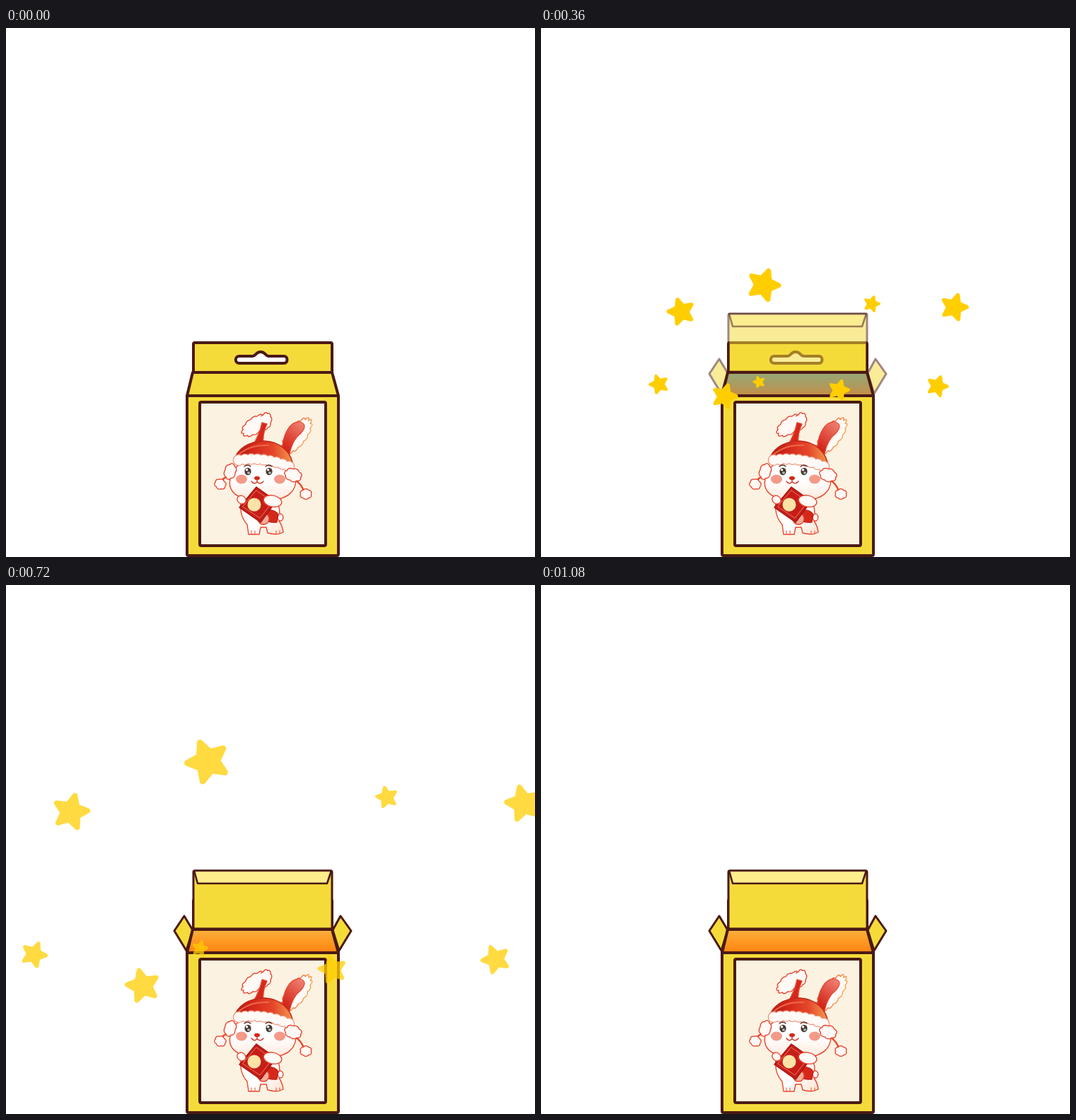
An HTML page with a canvas for the animation above (1.12 s loop, 748 by 748 pixels).

```html
<!DOCTYPE html>
<html lang="en">
<head>
<meta charset="utf-8">
<title>Gift box</title>
<style>
html, body { margin: 0; width: 100%; height: 100%; overflow: hidden; background: #fff; }
canvas { display: block; width: 748px; height: 748px; }
</style>
</head>
<body>
<canvas id="stage" width="748" height="748"></canvas>
<script>
const SIZE = 748, LOOP = 1120, STEP = 40, OPEN = 160;
const INK = '#4a1a14', YELLOW = '#f5db3a', PALE = '#ffee8c', CREAM = '#fcf2e1';
const RED = '#d5281b', LINE = '#e8452f', FUR = '#fffaf6', PINK = '#f49a88', GOLD = '#ffe3a6';
const TAU = 2 * Math.PI;

const view = document.getElementById('stage').getContext('2d');
let ctx = view;

const clamp = v => Math.max(0, Math.min(1, v));
const mix = (a, b, p) => a + (b - a) * p;

function paint(path, fill, stroke, width) {
  if (fill) { ctx.fillStyle = fill; ctx.fill(path); }
  if (stroke) {
    ctx.strokeStyle = stroke;
    ctx.lineWidth = width;
    ctx.stroke(path);
  }
}

function shape(d, fill, stroke, width = 4) {
  paint(new Path2D(d), fill, stroke, width);
}

function oval(x, y, rx, ry, fill, stroke, turn = 0) {
  const path = new Path2D();
  path.ellipse(x, y, rx, ry, turn, 0, TAU);
  paint(path, fill, stroke, 1.4);
}

function box(x, y, w, h, fill, width = 4) {
  const path = new Path2D();
  path.roundRect(x, y, w, h, 2);
  paint(path, fill, INK, width);
}

// Ellipse whose edge swells into n soft bumps
function fluff(x, y, rx, ry, turn, n, stroke = LINE) {
  const path = new Path2D();
  for (let a = 0; a < TAU; a += 0.05) {
    const k = 0.92 + 0.13 * Math.abs(Math.sin(a * n / 2));
    const u = rx * k * Math.cos(a), v = ry * k * Math.sin(a);
    path.lineTo(x + u * Math.cos(turn) - v * Math.sin(turn), y + u * Math.sin(turn) + v * Math.cos(turn));
  }
  path.closePath();
  paint(path, FUR, stroke, 1.4);
}

function fade(x0, y0, x1, y1, ...colors) {
  const g = ctx.createLinearGradient(x0, y0, x1, y1);
  colors.forEach((c, i) => g.addColorStop(i / (colors.length - 1), c));
  return g;
}

// Static artwork, drawn once and slightly softened
function layer(art) {
  const sheets = [0, 1].map(() => {
    const c = document.createElement('canvas');
    c.width = c.height = SIZE;
    return c;
  });
  const [sharp, soft] = sheets.map(c => c.getContext('2d'));
  ctx = sharp;
  ctx.lineJoin = ctx.lineCap = 'round';
  art();
  ctx = view;
  soft.filter = 'blur(0.5px)';
  soft.drawImage(sheets[0], 0, 0);
  return sheets[1];
}

function ears() {
  fluff(352, 562, 21, 11, -0.62, 12);
  fluff(367, 556, 8, 12, 0.25, 8);
  oval(353, 561, 17, 8, FUR, null, -0.62);
  shape('M349 590Q359 574 362 558L369 560Q362 575 364 590Z', RED, LINE, 1.4);
  fluff(411, 577, 30, 13, -0.92, 16, fade(398, 570, 430, 580, LINE, '#f9b25c'));
  shape('M391 596C391 574 402 556 415 557Q428 560 417 573Q405 582 401 602Z',
    fade(395, 592, 421, 560, RED, '#ef8173'), LINE, 1.2);
}

function body() {
  shape('M333 663Q328 688 341 702L343 716H358L360 706H368L370 714Q383 718 392 713Q391 704 386 697Q390 680 380 662Z',
    fade(345, 670, 385, 714, FUR, '#fff', '#ffe7d8'), LINE, 1.4);
  oval(388, 692, 3.8, 5, FUR, LINE);
  shape('M364 682Q380 679 385 688L383 699Q372 700 364 695Z', RED, '#b9201a', 1.2);
  oval(364, 694, 8, 8, '#f4ad98', LINE);
  for (const x of [347, 352, 382, 387]) shape(`M${x} 711v4`, null, LINE, 1);
}

function head() {
  shape('M320 628C306 660 335 669 363 668C397 669 416 656 408 626C397 602 331 604 320 628Z',
    fade(364, 610, 364, 668, '#fff', '#fff', '#ffe9dc'), LINE, 1.4);
  shape('M322 613C326 595 344 584 366 584C387 585 405 599 406 622Q366 598 322 613Z',
    fade(322, 610, 407, 604, '#a91713', RED, '#e4472b', '#f5a04f'), '#c2271a', 1.5);
  shape('M329 603Q345 589 371 590', null, '#ef6849', 2);
  // Brim: overlapping puffs along an arc
  for (const grow of [1.2, 0]) {
    for (let i = 0; i <= 8; i++) {
      const u = i / 8;
      oval(mix(329, 400, u), mix(611, 620, u) - 20 * u * (1 - u), 7 + grow, 7 + grow, grow ? '#f08f78' : FUR);
    }
  }
  shape('M316 634Q307 635 304 642M409 639Q418 645 421 655', null, LINE, 2.4);
  fluff(317, 627, 8, 11, 0.3, 6);
  fluff(406, 632, 12, 9, 0.3, 7);
  fluff(303, 645, 8, 7, 0.4, 6);
  fluff(424, 659, 8, 7, 0, 6);
}

function face() {
  for (const side of [-1, 1]) {
    const x = 357 + side * 15;
    oval(360 + side * 27, 638, 8, 6.5, PINK);
    oval(x, 627, 4.6, 5.2, '#4a3832');
    oval(x - 1.4, 624.8, 1.6, 1.7, '#fff');
    oval(x + 1, 629, 2, 1.8, '#a9c1b5');
    shape(`M${x - 5} 620q5 -4 9 0`, null, '#5b3029', 1.3);
  }
  oval(355, 636.5, 4, 2.7, RED);
  shape('M355 639v3M347 641q4 5 8 1q5 4 9 -1', null, '#cf382a', 1.5);
}

function card() {
  shape('M354 649L382 669L360 699L330 678Z', '#c71d18', '#a81712', 1.5);
  shape('M354 654L377 670L359 693L335 677Z', null, '#e9785b', 1);
  oval(351, 674, 9.5, 9.5, GOLD);
  oval(333, 667, 6.5, 5.5, FUR, LINE, 0.6);
  oval(377, 669, 13, 8, FUR, LINE, 0.2);
}

const MOUTH = 'M264 487H461L470 520H256Z';
const mouth = (...colors) => layer(() => shape(MOUTH, fade(0, 487, 0, 519, ...colors), INK));

const front = layer(() => {
  box(256, 520, 214, 226, YELLOW);
  box(274, 529, 178, 203, CREAM);
  for (const part of [ears, body, head, face, card]) part();
});

const hanger = layer(() => {
  box(265, 445, 196, 43, YELLOW);
  shape('M330 464H349C353 464 353 458 360 458C367 458 367 464 371 464H393C399 464 399 474 393 474H330C323 474 323 464 330 464Z',
    '#fff', INK);
});

const lid = mouth(YELLOW, YELLOW);
const inside = mouth('#2da2ba', '#4aa0a8', '#889a80');
const flaps = [
  layer(() => box(265, 404, 196, 82, YELLOW, 3)),
  layer(() => shape('M266 404H460L454 422H271Z', PALE, INK, 2.6)),
  layer(() => shape('M252 468L264 488L255 517L238 489Z', YELLOW, INK, 3)),
  layer(() => shape('M473 468L488 489L471 517L462 488Z', YELLOW, INK, 3)),
  mouth('#f7b03e', '#ff9a25', '#ff8512')
];

// Radius, spin direction, resting place
const STARS = [
  [33, -1, 284, 247], [27.5, -1, 88, 319], [16.5, 1, 541, 298],
  [27.5, 1, 737, 307], [19.5, 1, 35, 528], [25.5, 1, 191, 580],
  [12, -1, 273, 518], [21, 1, 463, 553], [21.5, -1, 697, 536]
];
const HOME = { x: 360, y: 492 }, BURST = 420, REST = 680;

// Fast burst that eases into a slow, steady drift
function travel(time, power, drift) {
  const burst = 1 - (1 - clamp(time / BURST)) ** power;
  return mix(burst, time / REST, drift);
}

function star(x, y, r, turn) {
  const at = (k, d) => {
    const a = turn + k * Math.PI / 5;
    return [x + d * r * Math.sin(a), y - d * r * Math.cos(a)];
  };
  ctx.beginPath();
  ctx.moveTo(...at(-1, 0.57));
  for (let k = 0; k < 10; k += 2) {
    const notch = at(k + 1, 0.57);
    ctx.arcTo(...at(k, 1.18), ...notch, r * 0.13);
    ctx.lineTo(...notch);
  }
  ctx.fill();
}

function drawStars(t) {
  const time = t - OPEN;
  if (time < 0) return;
  ctx.globalAlpha = clamp((960 - t) / 320);
  ctx.fillStyle = '#ffce00';
  const px = travel(time, 1.5, 0.08), py = travel(time, 1.2, 0.06);
  const grow = clamp((t - 120) / 320);
  STARS.forEach(([r, spin, x, y], i) => {
    // Low stars arc over before they sink
    const sag = Math.max(0, y - HOME.y) * 0.45;
    const turn = (i % 4 ? 0 : 36) + spin * 0.115 * (time - REST);
    star(mix(HOME.x, x, px), mix(HOME.y, y - sag, py) + sag * (time / REST) ** 2,
      r * grow, turn * Math.PI / 180);
  });
}

function put(image, alpha = 1) {
  view.globalAlpha = alpha;
  view.drawImage(image, 0, 0);
}

function draw(t) {
  view.globalAlpha = 1;
  view.fillStyle = '#fff';
  view.fillRect(0, 0, SIZE, SIZE);
  put(hanger);
  put(t < OPEN ? lid : inside);
  if (t >= OPEN) flaps.forEach(f => put(f, clamp((t - 150) / 400)));
  put(front);
  drawStars(t);
}

const start = performance.now();
function tick() {
  const t = (performance.now() - start) % LOOP;
  draw(Math.floor(t / STEP) * STEP);
  requestAnimationFrame(tick);
}
tick();
</script>
</body>
</html>
```
